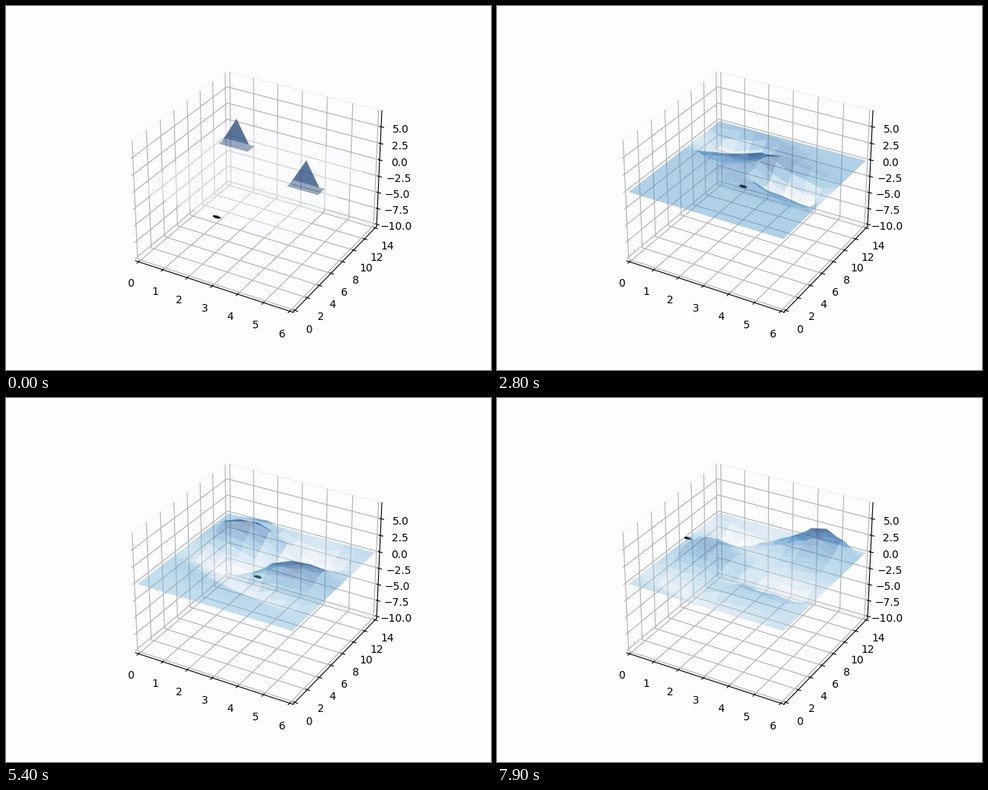
A matplotlib script for the animation above (8 s loop, 640 by 480 pixels).

```python
import numpy as np
import matplotlib.pyplot as plt
from matplotlib.animation import FuncAnimation

FRAMES, INTERVAL = 80, 100
LX, LY = 6.0, 14.0
NX, NY = 10, 25                      # cells per side
SOURCES = [(19, 2), (13, 8)]         # (row, column)
AMP, PERIOD = 4.0, 47.0
C, DT = 1.1, 0.1
ALPHA = 0.42

xs, ys = np.linspace(0, LX, NX + 1), np.linspace(0, LY, NY + 1)
X, Y = np.meshgrid(xs, ys)
RX, RY = (C * DT * NX / LX) ** 2, (C * DT * NY / LY) ** 2


def drive(z, n):
    for src in SOURCES:
        z[src] = AMP * np.cos(2 * np.pi * n / PERIOD)
    return z


def laplace_step(z):
    out = np.zeros_like(z)
    mid = z[1:-1, 1:-1]
    out[1:-1, 1:-1] = (RX * (z[1:-1, 2:] - 2 * mid + z[1:-1, :-2])
                       + RY * (z[2:, 1:-1] - 2 * mid + z[:-2, 1:-1]))
    return out


def solve_wave():
    """Leapfrog wave equation, fixed edges, two driven nodes."""
    z = [drive(np.zeros_like(X), 0)]
    z.append(drive(z[0] + 0.5 * laplace_step(z[0]), 1))
    for n in range(2, FRAMES):
        z.append(drive(2 * z[-1] - z[-2] + laplace_step(z[-1]), n))
    return z


waves = solve_wave()

# Floating ball: steady drift, then carried by the waves
KEYS = [0, 28, 38, 46, 62, 70, 79]
BALL_X = [3.17, 3.17, 3.06, 3.37, 3.22, 2.2, 0.02]
BALL_Y = [-0.1, 5.31, 5.29, 5.01, 6.48, 7.4, 8.79]
RADIUS = 0.145
th, ph = np.meshgrid(np.linspace(0, 2 * np.pi, 13), np.linspace(0, np.pi, 9))
SPHERE = RADIUS * np.array([np.cos(th) * np.sin(ph),
                            np.sin(th) * np.sin(ph),
                            np.cos(ph)])

fig = plt.figure(figsize=(6.4, 4.8), dpi=100, facecolor="#fdfdfd")
ax = fig.add_subplot(projection="3d", facecolor="#fdfdfd")
for axis in (ax.xaxis, ax.yaxis, ax.zaxis):
    axis.pane.fill = False


def padded(lo, hi):
    pad = (hi - lo) / 48
    return lo - pad, hi + pad


artists = []


def update(n):
    while artists:
        artists.pop().remove()
    bx, by = np.interp(n, KEYS, BALL_X), np.interp(n, KEYS, BALL_Y)
    sx, sy, sz = SPHERE
    artists.append(ax.plot_surface(bx + sx, by + sy, sz, color="black"))
    artists.append(ax.plot_surface(X, Y, waves[n], cmap="Blues", alpha=ALPHA))
    ax.set(xlim=padded(0, LX), ylim=padded(0, LY), zlim=padded(-10, 7))
    return artists


anim = FuncAnimation(fig, update, frames=FRAMES, interval=INTERVAL,
                     init_func=lambda: artists, repeat=True, repeat_delay=0,
                     blit=False)
plt.show()
```
